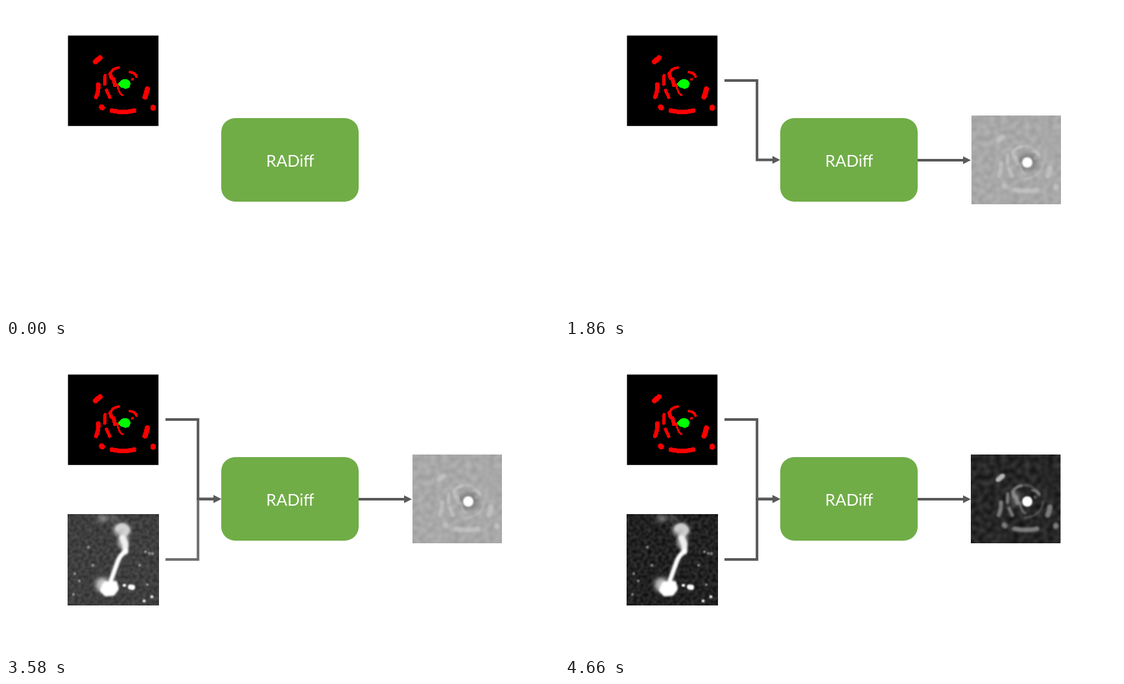
These frames come from a looping animation (853x480 px, 7.74 s). An HTML page:

```html
<!DOCTYPE html>
<html lang="en">
<head>
<meta charset="utf-8">
<title>RADiff</title>
<style>
  html, body { margin: 0; width: 100%; height: 100%; overflow: hidden; background: #fff; }
  svg { display: block; width: 853px; height: 480px; }
  text { font: 25px Lato, "Open Sans", sans-serif; fill: #fff; text-anchor: middle; }
  .arrow path { fill: none; stroke: #595959; stroke-width: 4; }
  .arrow polygon { fill: #595959; }
  .fade { animation: 7740ms linear infinite both; }
  .mask-arrow { animation-name: mask-arrow; }
  .result { animation-name: result; }
  .sky { animation-name: sky; }
  .refined { animation-name: refined; }
  /* each fade advances every 60 ms */
  @keyframes mask-arrow {
    0% { opacity: 0; }
    0.7752% { opacity: 0; animation-timing-function: steps(13); }
    10.8527%, 100% { opacity: 1; }
  }
  @keyframes result {
    0% { opacity: 0; }
    10.8527% { opacity: 0; animation-timing-function: steps(17); }
    24.031%, 100% { opacity: 1; }
  }
  @keyframes sky {
    0% { opacity: 0; }
    36.1757% { opacity: 0; animation-timing-function: steps(15); }
    47.8036%, 100% { opacity: 1; }
  }
  @keyframes refined {
    0% { opacity: 0; }
    46.2532% { opacity: 0; animation-timing-function: steps(18); }
    60.2067%, 100% { opacity: 1; }
  }
</style>
</head>
<body>
<svg viewBox="0 0 853 480">
  <defs>
    <filter id="pale" x="0" y="0" width="1" height="1" color-interpolation-filters="sRGB">
      <feTurbulence type="fractalNoise" baseFrequency=".11" numOctaves="1" seed="4"/>
      <feColorMatrix values=".14 0 0 0 .59  .14 0 0 0 .59  .14 0 0 0 .59  0 0 0 0 1"/>
    </filter>
    <filter id="dark" x="0" y="0" width="1" height="1" color-interpolation-filters="sRGB">
      <feTurbulence type="fractalNoise" baseFrequency=".11" numOctaves="1" seed="4"/>
      <feColorMatrix values=".24 0 0 0 .03  .24 0 0 0 .03  .24 0 0 0 .03  0 0 0 0 1"/>
    </filter>
    <filter id="grain" x="0" y="0" width="1" height="1" color-interpolation-filters="sRGB">
      <feTurbulence type="fractalNoise" baseFrequency=".18" numOctaves="1" seed="9"/>
      <feColorMatrix values=".24 0 0 0 .01  .24 0 0 0 .01  .24 0 0 0 .01  0 0 0 0 1"/>
    </filter>
    <filter id="soft" x="-50%" y="-50%" width="200%" height="200%"><feGaussianBlur stdDeviation="1.6"/></filter>
    <filter id="haze" x="-50%" y="-50%" width="200%" height="200%"><feGaussianBlur stdDeviation="3"/></filter>
    <filter id="fine" x="-50%" y="-50%" width="200%" height="200%"><feGaussianBlur stdDeviation=".8"/></filter>
    <clipPath id="sky-box"><rect x="95.600" y="261" width="139.600" height="140.300"/></clipPath>
    <clipPath id="first-box"><rect x="627" y="169" width="138" height="137"/></clipPath>
    <clipPath id="refined-box"><rect x="626" y="169" width="137.300" height="137"/></clipPath>

    <g id="arcs" fill="none" stroke-linecap="round" stroke-linejoin="round">
      <path stroke-width="8" d="M138 86L145 80"/>
      <path stroke-width="4" d="M174 95Q164 96 161 105"/>
      <path stroke-width="6" d="M161 105L162.500 111M166 113L168 122"/>
      <path stroke-width="3" d="M172 121Q173 134 180 138"/>
      <path stroke-width="5" d="M153 107.500L152.500 121"/>
      <path stroke-width="6.500" d="M142.500 121Q143 131 139 140.500"/>
      <path stroke-width="5" d="M155 130L160 141"/>
      <path stroke-width="4" d="M191 102Q199 103 201.500 109M195 113h.1"/>
      <path stroke-width="8" d="M218 128Q217 135 214.500 140.500"/>
      <path stroke-width="8.500" d="M147.500 156l1 1M227 156.500v1"/>
      <path stroke-width="7" d="M163 161.500Q180 165.500 198 161.500"/>
    </g>
    <path id="rings" d="M694 222Q714 207 732 230M738 240Q736 264 708 267" fill="none" stroke-width="3" filter="url(#soft)"/>
  </defs>

  <rect width="853" height="480" fill="#fff"/>

  <rect x="95.600" y="45.600" width="139.600" height="139.600"/>
  <g shape-rendering="crispEdges">
    <use href="#arcs" stroke="#f00"/>
    <path fill="#0f0" d="M173 119L177 115L182 112.500L189 114L192.500 119L190 126L184 128L178 126L174 123Z"/>
  </g>

  <g class="fade mask-arrow arrow">
    <path d="M246 115H296.200V237.500H321"/>
    <polygon points="320,231.500 332,237.500 320,243.500"/>
  </g>

  <g class="fade sky">
    <g class="arrow">
      <path d="M246 331H296.200V238H321"/>
      <polygon points="320,232 332,238 320,244"/>
    </g>
    <g clip-path="url(#sky-box)">
      <rect x="95" y="260" width="141" height="142" filter="url(#grain)"/>
      <g filter="url(#haze)" fill="#bbb">
        <ellipse cx="149" cy="370" rx="11" ry="11"/>
        <ellipse cx="179" cy="285" rx="13" ry="10"/>
        <ellipse cx="181" cy="303" rx="8" ry="12"/>
        <ellipse cx="149" cy="268" rx="8" ry="5" opacity=".6"/>
        <ellipse cx="167" cy="267" rx="6" ry="4" opacity=".4"/>
      </g>
      <g filter="url(#soft)" fill="none" stroke-linecap="round" stroke-linejoin="round">
        <path stroke="#ccc" stroke-width="8" d="M173 283Q181 275 187 286L179 297"/>
        <path stroke="#eee" stroke-width="9" d="M180 298L184 307L184 319"/>
        <path stroke="#fff" stroke-width="7" d="M185 318Q176 324 172 335L162 363"/>
        <path fill="#fff" stroke="#fff" stroke-width="8" d="M153 369L168 368L170 376L165 383L154 384L149 378Z"/>
      </g>
      <g filter="url(#fine)" fill="none" stroke-linecap="round">
        <path stroke="#fff" stroke-width="8" d="M192 373.500L195 374"/>
        <path stroke="#fff" stroke-width="4.500" d="M182 371h1M213 395h.1M225 388.500h.1"/>
        <path stroke="#999" stroke-width="4" d="M215 319h.1M221 321.500h.1M127 312h.1M134 340h.1M106 353h.1M104 385h.1M206 340h.1M218 370h.1M226 322h.1M113 364h.1"/>
      </g>
    </g>
  </g>

  <g class="fade result">
    <g class="arrow">
      <path d="M544 238H615"/>
      <polygon points="614,232 626,238 614,244"/>
    </g>
    <g clip-path="url(#first-box)">
      <rect x="627" y="169" width="138" height="137" filter="url(#pale)"/>
      <ellipse cx="713" cy="241" rx="16" ry="14" fill="#666" opacity=".55" filter="url(#haze)"/>
      <use href="#arcs" x="530" y="122" stroke="#d0d0d0" opacity=".55" filter="url(#soft)"/>
      <use href="#rings" stroke="#c8c8c8" opacity=".5"/>
      <circle cx="713" cy="241.500" r="8" fill="#fff" filter="url(#fine)"/>
    </g>
  </g>

  <g class="fade refined" clip-path="url(#refined-box)">
    <rect x="626" y="169" width="138" height="137" filter="url(#dark)"/>
    <ellipse cx="695" cy="237" rx="8" ry="12" fill="#888" opacity=".5" filter="url(#haze)"/>
    <use href="#arcs" x="530" y="122" stroke="#aaa" opacity=".65" filter="url(#soft)"/>
    <use href="#rings" stroke="#888" opacity=".5"/>
    <path d="M668 208L675 202" stroke="#bbb" stroke-width="6" stroke-linecap="round" filter="url(#soft)"/>
    <circle cx="713" cy="241.500" r="8" fill="#fff" filter="url(#fine)"/>
  </g>

  <rect x="332" y="173" width="212" height="129" rx="21.500" fill="#70ad47"/>
  <text x="438.300" y="248">RADiff</text>
</svg>
</body>
</html>
```
